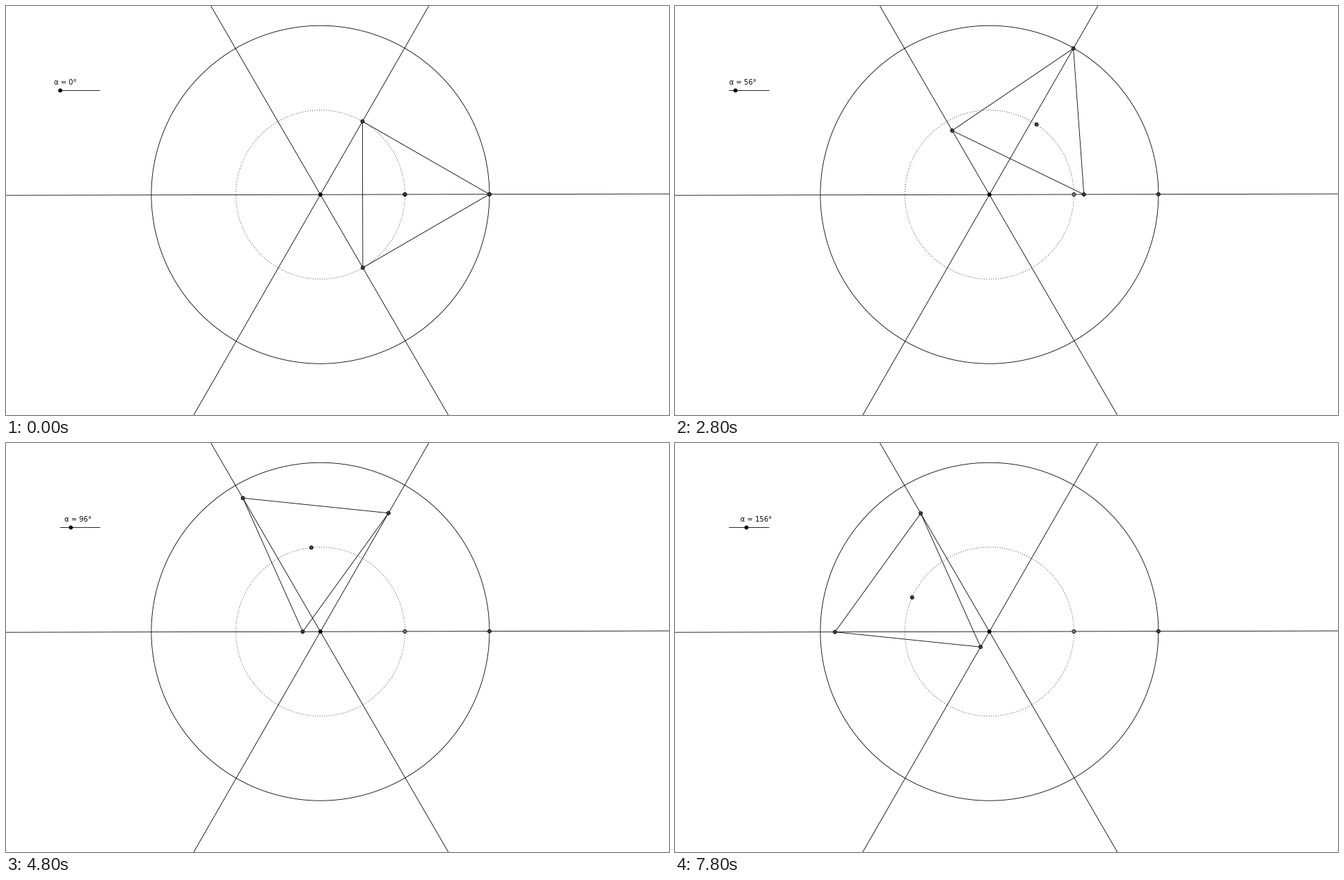
Write a matplotlib script that moves like this. It is 953x588 px and loops after 8 s.

```python
import numpy as np
import matplotlib.pyplot as plt
from matplotlib.animation import FuncAnimation
from matplotlib.patches import Circle

W, H, DPI = 953, 588, 64
PX = 72 / DPI                       # points per pixel
STEPS, STEP_MS, STEP_DEG = 40, 200, 4

CX, CY, R = 451.9, 271.2, 243.0     # centre and radius of the big circle
TILT = 0.125                        # slight rotation of the whole figure
AXES = np.array([0, 60, 120])
SLIDER_X, SLIDER_Y, SLIDER_LEN = 78, 121.5, 57
LINE = 0.84                         # line width in pixels
DARK, GRAY = "#404040", "#808080"

fig = plt.figure(figsize=(W / DPI, H / DPI), dpi=DPI, facecolor="white")
ax = fig.add_axes([0, 0, 1, 1])
ax.set(xlim=(0, W), ylim=(H, 0))
ax.axis("off")


def polar(r, deg):
    t = np.radians(np.asarray(deg) + TILT)
    return CX + r * np.cos(t), CY - r * np.sin(t)


def stroke(x, y, **style):
    return ax.plot(x, y, color="black", lw=LINE * PX, snap=False,
                   solid_joinstyle="round", **style)[0]


def dot(pos, fill):
    return ax.add_patch(Circle(pos, 2.5, fc=fill, ec="black", lw=LINE * PX, zorder=5))


def vertices(alpha):
    """Each corner slides along its own axis."""
    return polar(R * np.cos(np.radians(alpha - AXES)), AXES)


for angle in AXES:
    stroke(*polar(np.array([-700, 700]), angle))

turn = np.linspace(0, 360, 721)
stroke(*polar(R, turn))
stroke(*polar(R / 2, turn), linestyle=(0, (1, 3)), dash_capstyle="butt")
stroke([SLIDER_X, SLIDER_X + SLIDER_LEN], [SLIDER_Y, SLIDER_Y])

triangle = stroke([], [])
dot(polar(R / 2, 0), GRAY)
dot(polar(R, 0), DARK)
corners = [dot((0, 0), DARK) for _ in AXES]
roller = dot((0, 0), DARK)
dot((CX, CY), "black")
knob = dot((SLIDER_X, SLIDER_Y), "black")
label = ax.text(0, 113, "", family="DejaVu Sans", size=10 * PX, color="black",
                ha="left", va="baseline")


def update(i):
    alpha = i * STEP_DEG
    x, y = vertices(alpha)
    triangle.set_data(np.append(x, x[0]), np.append(y, y[0]))
    for corner, pos in zip(corners, zip(x, y)):
        corner.center = pos
    roller.center = polar(R / 2, alpha)

    knob_x = SLIDER_X + SLIDER_LEN * alpha / 360
    knob.center = knob_x, SLIDER_Y
    label.set_x(round(knob_x - 8.8))
    label.set_text(f"α = {alpha}°")
    return triangle, *corners, roller, knob, label


anim = FuncAnimation(fig, update, frames=STEPS, interval=STEP_MS,
                     repeat=True, repeat_delay=0, blit=False)
plt.show()
```
